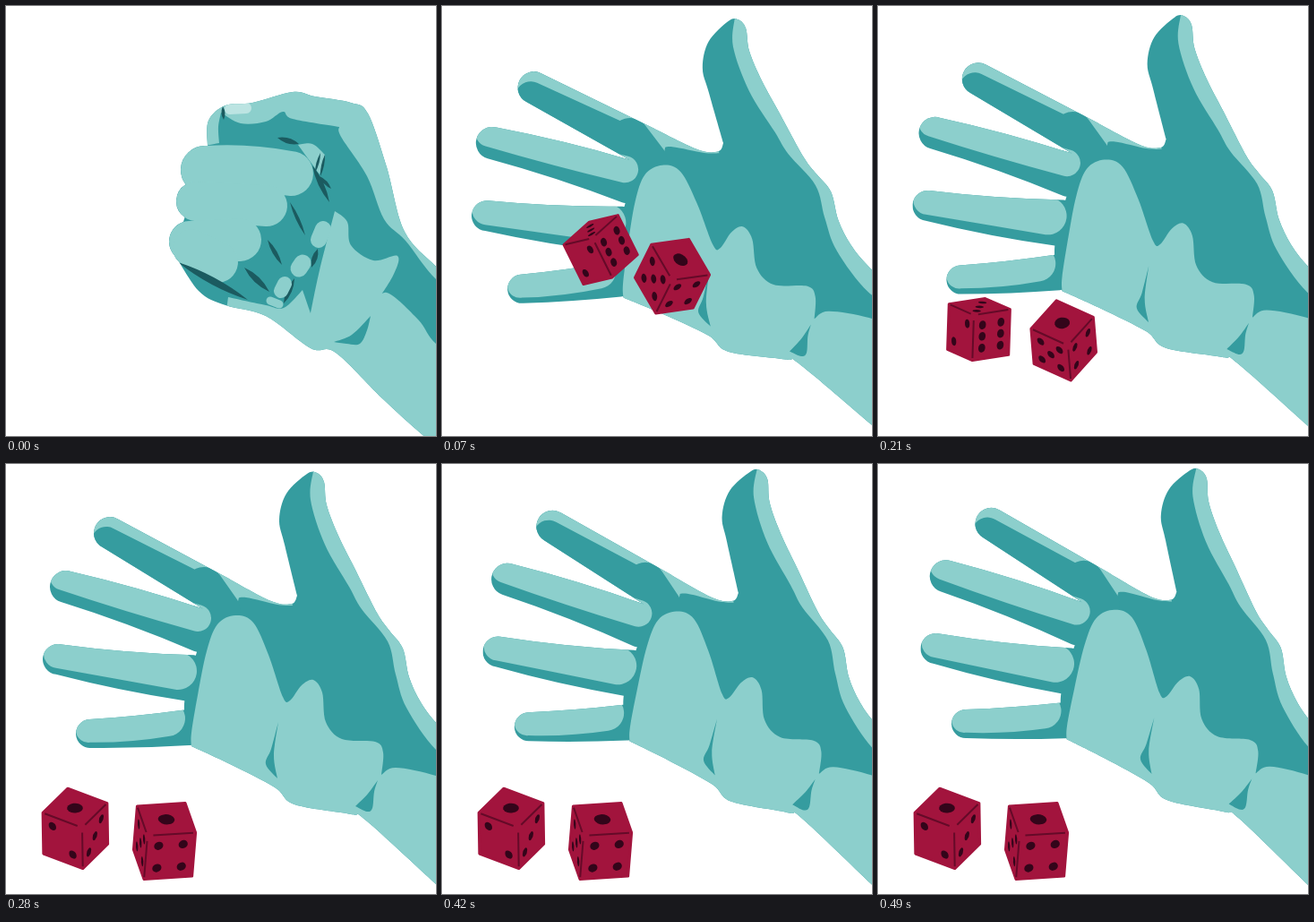
Write an HTML page that moves like this. It is 480 px wide and 480 px high and loops after 0.56 s.

```html
<!DOCTYPE html>
<html lang="en">
<head>
<meta charset="utf-8">
<title>Dice throw</title>
<style>
  html, body { margin: 0; width: 100%; height: 100%; overflow: hidden; background: #fff; }
  svg { display: block; width: 100%; height: 100%; }
</style>
</head>
<body>
<svg id="stage" viewBox="0 0 480 480"></svg>
<script>
const LIGHT = '#8ccfcc', DARK = '#359c9f', DEEP = '#1b5b60', NAIL = '#bce4e2';
const RED = '#a2143d', EDGE = '#650a28', PIP = '#33051a';
const STEP = 70, STEPS = 8;

const fill = (color, ...paths) => `<path fill="${color}" d="${paths.join('')}"/>`;

// Smooth closed curve through points; "!" after a point makes a sharp corner.
function curve(text) {
  const p = text.trim().split(/\s+/).flatMap(s => {
    const xy = s.replace('!', '').split(',').map(Number);
    return s.endsWith('!') ? [xy, xy] : [xy];
  });
  const n = p.length, at = i => p[(i + n) % n];
  let d = 'M' + p[0];
  for (let i = 0; i < n; i++) {
    const [a, b, c, e] = [at(i - 1), at(i), at(i + 1), at(i + 2)];
    if (b === c) continue;
    const c1 = b.map((v, k) => v + (c[k] - a[k]) / 6);
    const c2 = c.map((v, k) => v - (e[k] - b[k]) / 6);
    d += `C${c1} ${c2} ${c}`;
  }
  return d + 'Z';
}

// Returns a point beside the line from (x0, y0) to (x1, y1): t along, w across.
function beside(x0, y0, x1, y1) {
  const dx = x1 - x0, dy = y1 - y0, len = Math.hypot(dx, dy);
  return (t, w) => [x0 + dx * t - dy / len * w, y0 + dy * t + dx / len * w];
}

// Tapered limb with round ends, from tip to root.
function limb(x0, y0, r0, x1, y1, r1, bow = 0) {
  const at = beside(x0, y0, x1, y1), r = (r0 + r1) / 2;
  return `M${at(0, r0)}Q${at(.5, r + bow * 2)} ${at(1, r1)}A${r1} ${r1} 0 0 0 ${at(1, -r1)}` +
    `Q${at(.5, bow * 2 - r)} ${at(0, -r0)}A${r0} ${r0} 0 0 0 ${at(0, r0)}Z`;
}

// Thin fold, widest in the middle.
function fold(x0, y0, x1, y1, w) {
  const at = beside(x0, y0, x1, y1);
  return `M${at(0, 0)}Q${at(.5, w)} ${at(1, 0)}Q${at(.5, -w)} ${at(0, 0)}Z`;
}

// Dark silhouette with lighter shapes cut to it.
function shaded(id, outline, inside) {
  const parts = outline.map(d => `<path d="${d}"/>`).join('');
  return `<clipPath id="${id}">${parts}</clipPath>
    <g clip-path="url(#${id})"><rect width="520" height="520" fill="${DARK}"/>${inside}</g>`;
}

const indexFinger = limb(116, 77, 18, 238, 147, 22);

const openHand = shaded('openClip', [
  curve(`520,330! 482,291 463,266 450,238 443,206 428,186 414,166 389,116 371,80 358,46 355,20 347,10 336,11
    313,33 305,62 311,90 325,147! 319,156 296,153 245,126! 231,167! 213,210 199,268 207,315!
    250,335 300,361 322,380 385,391 402,398 480,469 520,505!`),
  indexFinger,
  limb(67, 137, 18, 217, 186, 24, -2),
  limb(58, 218, 17, 206, 239, 26, 2),
  limb(94, 301, 16, 203, 294, 20, 1)
],
  fill(LIGHT, indexFinger) +
  fill(LIGHT, curve('235,110! 318,150! 320,158! 303,157 268,149 255,151! 240,130!')) +
  fill(DARK, limb(112, 87, 17, 205, 135, 18), limb(221, 137, 22, 240, 164, 22)) +
  fill(LIGHT,
    limb(64, 126, 15, 214, 172, 15, 1),
    limb(58, 212, 16, 192, 231, 21),
    limb(92, 297, 14, 180, 284, 20, 2)) +
  fill(LIGHT, curve(`343,8! 340,40 356,90 383,137 397,162 426,198 435,235 447,272 480,319 520,345!
    520,0!`)) +
  fill(LIGHT, curve(`207,316! 207,300 214,258 224,209 236,179 256,169 276,177 293,213 309,260 317,264 330,247
    343,241 353,255 357,288 375,307 412,310 421,322 419,347! 435,339 480,348 520,365! 520,520! 200,400!`)) +
  fill(DARK, curve('304,288! 296,318 290,335 303,351! 299,325'),
    curve('415,353! 404,368 390,382! 403,388 409,384 411,366')));

const curled = [
  limb(222, 183, 27, 318, 187, 25, -3), limb(212, 218, 22, 291, 223, 23),
  limb(205, 263, 23, 261, 261, 24), limb(207, 270, 21, 236, 286, 23)
];

const fist = shaded('fistClip', [
  curve(`520,335! 482,293 445,252 425,180 404,120 385,108 345,101 320,96 275,108 245,111 226,128 225,157!
    187,275! 215,318 245,334 290,346 340,382 368,387 420,438 470,483 520,520!`),
  ...curled
],
  fill(LIGHT, curve(`240,119! 262,131 290,129 309,118 320,126 372,135! 374,146 403,190 422,238 446,262 480,305
    520,330! 520,60! 200,60! 200,160! 238,153! 237,135`)) +
  fill(LIGHT, curve(`246,340! 248,325! 290,334 310,337 331,317! 340,343! 350,295 367,229! 381,241 385,267 410,284
    437,279 432,301 409,337! 425,320 460,350 480,377 520,400! 520,520! 230,520!`)) +
  curled.map(d => fill(LIGHT, d)).join('') +
  fill(DARK, curve('366,375! 386,367 407,346! 403,362 395,377 380,377')) +
  fill(NAIL, limb(250, 115, 6, 268, 114, 6)) +
  fill(LIGHT, curve('326,155! 342,154 356,166! 350,188!')) +
  fill(DEEP,
    fold(303, 147, 327, 154, 6), fold(317, 219, 334, 256, 4), fold(292, 261, 308, 289, 5),
    fold(266, 292, 294, 319, 7), fold(192, 286, 270, 328, 8), fold(342, 178, 361, 219, 6),
    fold(350, 190, 363, 204, 4), fold(348, 271, 341, 292, 6), fold(322, 304, 310, 332, 6),
    fold(242, 112, 243, 127, 4), fold(351, 164, 345, 186, 3), fold(356, 166, 351, 190, 3)) +
  fill(LIGHT,
    limb(354, 249, 9, 349, 261, 9), limb(331, 287, 9.5, 327, 293, 9.5),
    limb(311, 310, 8, 307, 318, 8), limb(295, 329, 4.5, 305, 333, 4.5)));

// Pip places on a unit face; a negative count mirrors the face.
function pips(count) {
  const n = Math.abs(count), lo = .25, hi = .76, spots = [];
  if (n % 2) spots.push([.5, .5]);
  if (n > 1) spots.push([lo, lo], [hi, hi]);
  if (n > 3) spots.push([lo, hi], [hi, lo]);
  if (n === 6) spots.push([lo, .5], [hi, .5]);
  return count < 0 ? spots.map(([x, y]) => [x, 1 - y]) : spots;
}

// Near corner, angles in degrees and size: on leaving the hand, in the air, at rest.
const pose = (x, y, yaw, tilt, roll, size) => ({ x, y, yaw, tilt, roll, size });
const dice = [
  { flying: [3, 6, 2], resting: [1, -3, -2],
    keys: [pose(168, 259, 41, 14, -28, 48), pose(107, 345, 35, 15, 2, 49), pose(85, 406, 57, 35, -1, 52)] },
  { flying: [1, 4, 5], resting: [1, 4, 5],
    keys: [pose(257, 306, 48, 40, 28, 51), pose(212, 379, 52, 43, -5, 50), pose(158, 415, 15, 34, 5, 55)] }
];

function poseAt(keys, step) {
  if (step > 3) return keys[2];
  const f = (step - 1) / 2, out = {};
  for (const k in keys[0]) out[k] = keys[0][k] + (keys[1][k] - keys[0][k]) * f;
  return out;
}

function drawDie({ flying, resting, keys }, step) {
  const { x, y, yaw, tilt, roll, size } = poseAt(keys, step);
  const faces = step > 3 ? resting : flying;
  const [s, t, r] = [yaw, tilt, roll].map(d => d * Math.PI / 180);
  const edge = (u, v) => [
    size * (u * Math.cos(r) - v * Math.sin(r)),
    size * (u * Math.sin(r) + v * Math.cos(r)) * 1.07
  ];
  const a = edge(Math.cos(s), -Math.sin(s) * Math.sin(t));
  const b = edge(-Math.sin(s), -Math.cos(s) * Math.sin(t));
  const c = edge(0, Math.cos(t));
  const sum = (...e) => e.reduce((p, q) => [p[0] + q[0], p[1] + q[1]], [x, y]);
  const hull = [sum(a), sum(a, b), sum(b), sum(b, c), sum(c), sum(a, c)].join(' ');
  const lines = [a, b, c].map(([u, v]) =>
    `M${x + u * .12} ${y + v * .12}L${x + u * .95} ${y + v * .95}`).join('');
  const dots = [[a, b], [a, c], [b, c]].map(([p, q], i) => {
    const radius = faces[i] === 1 ? .17 : .095;
    const spots = pips(faces[i]).map(([u, v]) => `<circle cx="${u}" cy="${v}" r="${radius}"/>`).join('');
    return `<g fill="${PIP}" transform="matrix(${[...p, ...q, x, y]})">${spots}</g>`;
  }).join('');
  return `<polygon points="${hull}" fill="${RED}" stroke="${RED}" stroke-width="3" stroke-linejoin="round"/>` +
    `<path d="${lines}" stroke="${EDGE}" stroke-width="2"/>${dots}`;
}

const stage = document.getElementById('stage');
stage.innerHTML = `<g id="fist">${fist}</g><g id="open">${openHand}</g><g id="dice"></g>`;
const [fistEl, openEl, diceEl] = ['fist', 'open', 'dice'].map(id => document.getElementById(id));
let shown = -1;

function draw(ms) {
  const step = Math.floor(ms / STEP) % STEPS;
  if (step === shown) return;
  shown = step;
  fistEl.style.display = step ? 'none' : '';
  openEl.style.display = step ? '' : 'none';
  const k = step - 4;
  openEl.setAttribute('transform', `rotate(${.64 * k - .03 * k * k} 478 436)`);
  diceEl.innerHTML = step ? dice.map(die => drawDie(die, step)).join('') : '';
}

let start;
function tick(now) {
  start ??= now;
  draw(now - start);
  requestAnimationFrame(tick);
}
draw(0);
requestAnimationFrame(tick);
</script>
</body>
</html>
```
